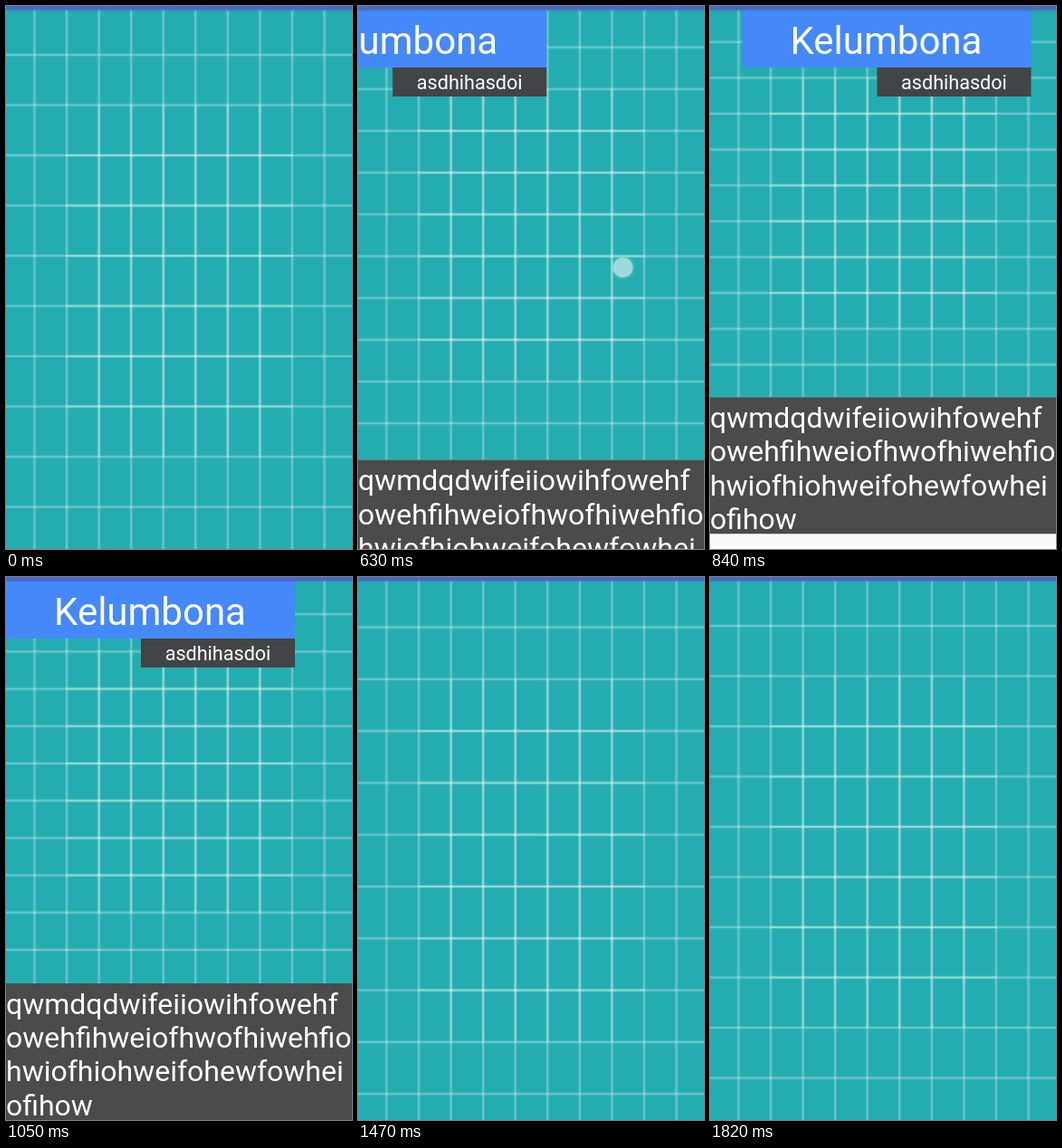
An HTML page with a canvas that plays this animation: 382 px wide and 600 px high, repeating every 1.89 s.

```html
<!DOCTYPE html>
<html lang="en">
<head>
<meta charset="utf-8">
<title>Sliding panels</title>
<style>
html, body { margin: 0; width: 100%; height: 100%; overflow: hidden; background: #fafafa; }
canvas { display: block; }
</style>
</head>
<body>
<canvas id="stage" width="382" height="600"></canvas>
<script>
const W = 382, H = 600, LOOP = 1890, STEP = 70, SLIDE = 420;
const OPEN = 560, CLOSE = 1260;
const PANEL_H = 151, TITLE_W = 319;
const ctx = document.getElementById('stage').getContext('2d');
const lines = [
  'qwmdqdwifeiiowihfowehf',
  'owehfihweiofhwofhiwehfio',
  'hwiofhiohweifohewfowhei',
  'ofihow'
];

function overshoot(t) {
  if (t <= 0) return 0;
  if (t >= 1) return 1;
  const u = t - 1;
  return u * u * (3 * u + 2) + 1;
}

function box(x, y, w, h, color) {
  ctx.fillStyle = color;
  ctx.fillRect(x, y, w, h);
}

function text(str, x, y, size, align) {
  ctx.font = `${size}px Roboto, sans-serif`;
  ctx.textAlign = align;
  ctx.fillStyle = '#fff';
  ctx.fillText(str, x, y);
}

// A soft line: a faint wide band with a stronger core.
function gridLine(x, y, w, h, bright) {
  const tall = h > w;
  const band = (size, alpha) => {
    const color = `rgba(255,255,255,${alpha})`;
    if (tall) box(x - size / 2, y, size, h, color);
    else box(x, y - size / 2, w, size, color);
  };
  band(4, bright ? 0.14 : 0.09);
  band(2, bright ? 0.42 : 0.24);
}

// The grid stretches to fill the space above the panel.
function drawGrid(bottom) {
  const d = bottom - 449;
  const first = 41.2 + 0.0848 * d;
  const gap = (412 + 0.937 * d - first) / 9;
  const row = k => first + (k - 1) * gap;
  const col = k => 31.5 + k * 35.55;

  box(0, 0, W, bottom, '#24adb0');
  for (let k = 0; k < 10; k++) {
    const x = col(k);
    if (k > 1 && k < 8) {
      gridLine(x, 0, 0, row(2), false);
      gridLine(x, row(2), 0, row(9) - row(2), true);
      gridLine(x, row(9), 0, bottom - row(9), false);
    } else {
      gridLine(x, 0, 0, bottom, false);
    }
  }
  for (let k = 1; k < 11; k++) {
    const y = row(k);
    if (k > 2 && k < 9) {
      gridLine(0, y, col(1), 0, false);
      gridLine(col(1), y, col(8) - col(1), 0, true);
      gridLine(col(8), y, W - col(8), 0, false);
    } else {
      gridLine(0, y, W, 0, false);
    }
  }
}

function circle(x, y, r, alpha) {
  ctx.fillStyle = `rgba(255,255,255,${alpha})`;
  ctx.beginPath();
  ctx.arc(x, y, r, 0, 7);
  ctx.fill();
}

// The finger is down for one step, then fades as the slide starts.
function drawTouch(x, y, age) {
  if (age < -STEP || age >= 210) return;
  const alpha = 0.75 * (1 - Math.max(0, age) / 210);
  circle(x, y, 13.5, alpha * 0.2);
  circle(x, y, 11, alpha);
}

function draw(t) {
  const open = overshoot((t - OPEN) / SLIDE) - overshoot((t - CLOSE) / SLIDE);
  const top = H - PANEL_H * open;
  const shift = TITLE_W * (open - 1);

  box(0, 0, W, H, '#fafafa');
  drawGrid(top);

  box(0, top, W, PANEL_H, '#4a4b4b');
  lines.forEach((str, i) => text(str, 0, top + 34 + i * 37.2, 32, 'left'));

  box(shift, 4, TITLE_W, 64, '#4588fa');
  text('Kelumbona', shift + 159, 53, 42, 'center');
  box(shift + 149, 68, 170, 32, '#434445');
  text('asdhihasdoi', shift + 234, 92, 21.6, 'center');

  box(0, 0, W, 4, '#4a68c6');
  box(0, 4, W, 1.5, 'rgba(64,104,190,.5)');

  drawTouch(292.5, 289, t - OPEN);
  drawTouch(317.5, 308, t - CLOSE);
}

const start = performance.now();
function tick() {
  const t = (performance.now() - start) % LOOP;
  draw(Math.floor(t / STEP) * STEP);
  requestAnimationFrame(tick);
}
tick();
</script>
</body>
</html>
```
